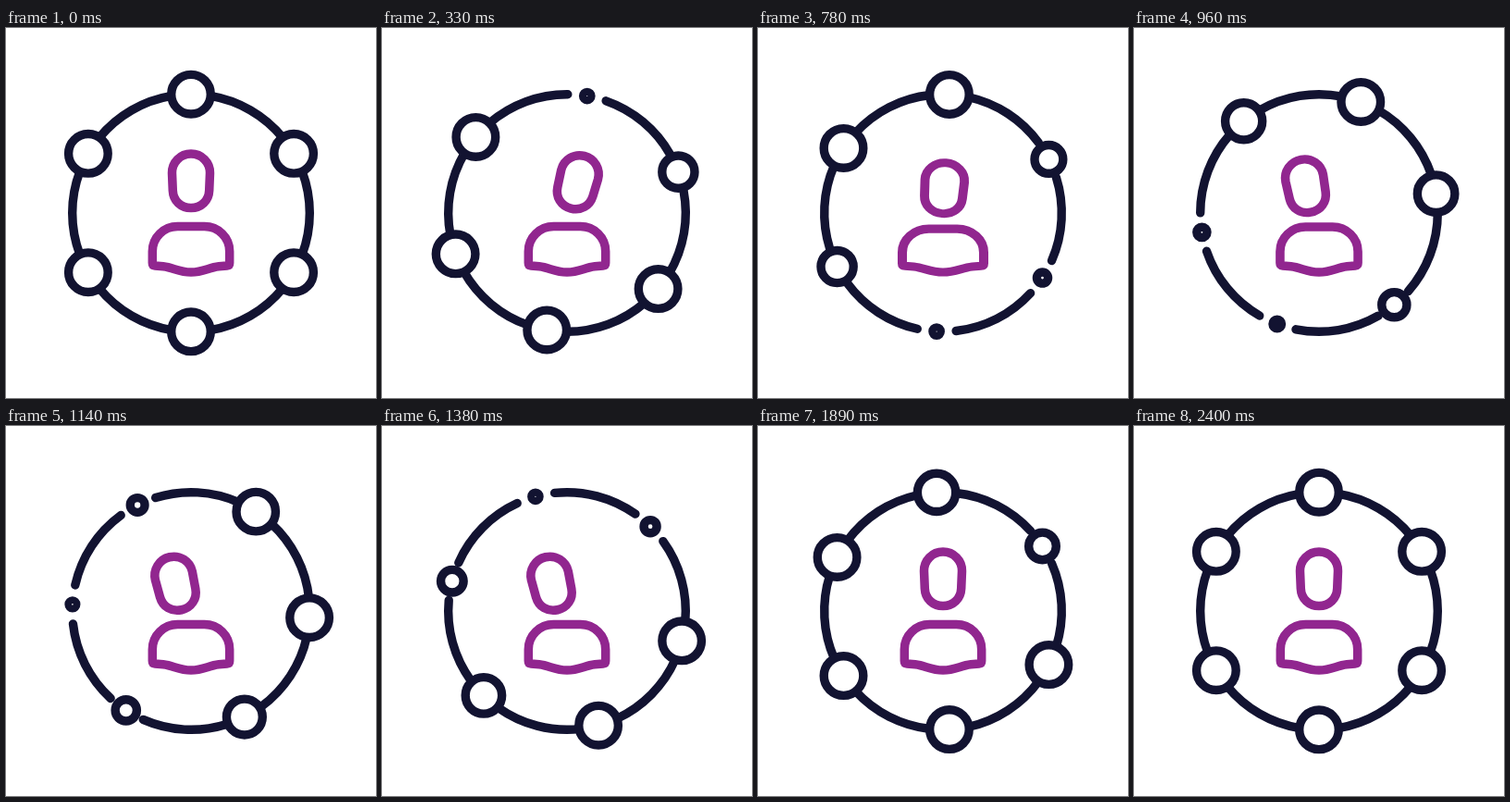
Write an HTML page that moves like this. It is 400 px wide and 400 px high and loops after 4.43 s.

```html
<!DOCTYPE html>
<html lang="en">
<head>
<meta charset="utf-8">
<title>Person in a ring of nodes</title>
<style>
  html, body { margin: 0; width: 100%; height: 100%; overflow: hidden; background: #fff; }
  svg { display: block; width: 100%; height: 100%; }
  .ring { fill: #fff; stroke: #121331; stroke-width: 9.4; stroke-linecap: round; }
  .person { fill: none; stroke: #91268f; stroke-width: 9.5; stroke-linejoin: round; }
</style>
</head>
<body>
<svg viewBox="0 0 400 400">
  <g id="ring" class="ring"></g>
  <g class="person">
    <path id="body" d="M-41.7 -23.5C-41.7 -38.5 -29.5 -50.4 -14.5 -50.4H14.5C29.5 -50.4 41.7 -38.5 41.7 -23.5V-11C41.7 -9 40.8 -8.2 39 -8.1L30 -7.3C19 -6 13 -1 0 -1C-13 -1 -19 -6 -30 -7.3L-39 -8.1C-40.8 -8.2 -41.7 -9 -41.7 -11Z"/>
    <path id="head" d="M0 -29.2C11.5 -29.2 20.6 -20 20.5 -8.5L19.7 10.5C19.2 21.5 11 29.3 0 29.3C-11 29.3 -19.2 21.5 -19.7 10.5L-20.5 -8.5C-20.6 -20 -11.5 -29.2 0 -29.2Z"/>
  </g>
</svg>
<script>
const LOOP = 4430, STEP = 30, SPIN = 2400;
const COUNT = 6, ORBIT = 128.3, GAP = 9.4;
const BIG = 21.3, SMALL = 3.4, STAGGER = 225;

const ring = document.getElementById('ring');
const head = document.getElementById('head');
const body = document.getElementById('body');

// Cubic easing with flat ends; a and b are the x values of its handles.
function ease(a, b) {
  return x => {
    if (x <= 0) return 0;
    if (x >= 1) return 1;
    let lo = 0, hi = 1, p = 0;
    for (let i = 0; i < 30; i++) {
      p = (lo + hi) / 2;
      const q = 1 - p;
      if (3 * q * q * p * a + 3 * q * p * p * b + p * p * p < x) lo = p;
      else hi = p;
    }
    return p * p * (3 - 2 * p);
  };
}

const spinEase = ease(.333, .171);
const sizeEase = ease(.333, .5);
const poseEase = ease(.333, .667);

// Value of a track of [time, values...] rows at time t.
function sample(track, t, curve) {
  let i = 0;
  while (i < track.length - 2 && t >= track[i + 1][0]) i++;
  const [t0, ...from] = track[i], [t1, ...to] = track[i + 1];
  const k = curve((t - t0) / (t1 - t0));
  return from.map((v, n) => v + (to[n] - v) * k);
}

const size = [[0, BIG], [400, SMALL], [1100, BIG]];

// time, x, y, tilt
const lean = [
  [0, 0, 0, 0],
  [310, 11.5, 1.5, 14.5],
  [600, 11.5, 1.5, 14.5],
  [1040, -16.7, 5, -13],
  [1440, -16.7, 5, -13],
  [1830, 0, 0, 0]
];
const dip = [[560, 0], [780, 1], [1020, 0]];

function point(deg) {
  const a = deg * Math.PI / 180;
  return [200 + ORBIT * Math.cos(a), 200 + ORBIT * Math.sin(a)];
}

function add(tag) {
  return ring.appendChild(document.createElementNS('http://www.w3.org/2000/svg', tag));
}

const list = tag => Array.from({ length: COUNT }, () => add(tag));
const arcs = list('path');
const nodes = list('circle');
arcs.forEach(arc => arc.setAttribute('fill', 'none'));

function draw(t) {
  const spin = 120 * spinEase(t / SPIN);
  for (let i = 0; i < COUNT; i++) {
    const deg = -90 + 60 * i + spin;
    const [x, y] = point(deg);
    nodes[i].setAttribute('cx', x);
    nodes[i].setAttribute('cy', y);
    nodes[i].setAttribute('r', sample(size, t - i * STAGGER, sizeEase)[0]);
    arcs[i].setAttribute('d',
      `M${point(deg + GAP)}A${ORBIT} ${ORBIT} 0 0 1 ${point(deg + 60 - GAP)}`);
  }
  const [x, y, tilt] = sample(lean, t, poseEase);
  const [d] = sample(dip, t, poseEase);
  head.setAttribute('transform',
    `translate(${200 + x} ${165.2 + y + 5.2 * d}) rotate(${tilt}) scale(${1 + .04 * d} ${1 - .06 * d})`);
  body.setAttribute('transform',
    `translate(200 265) scale(${1 + .055 * d} ${1 - .05 * d})`);
}

const start = performance.now();
function tick() {
  const t = (performance.now() - start) % LOOP;
  draw(Math.min(Math.floor(t / STEP) * STEP, SPIN));
  requestAnimationFrame(tick);
}
tick();
</script>
</body>
</html>
```
